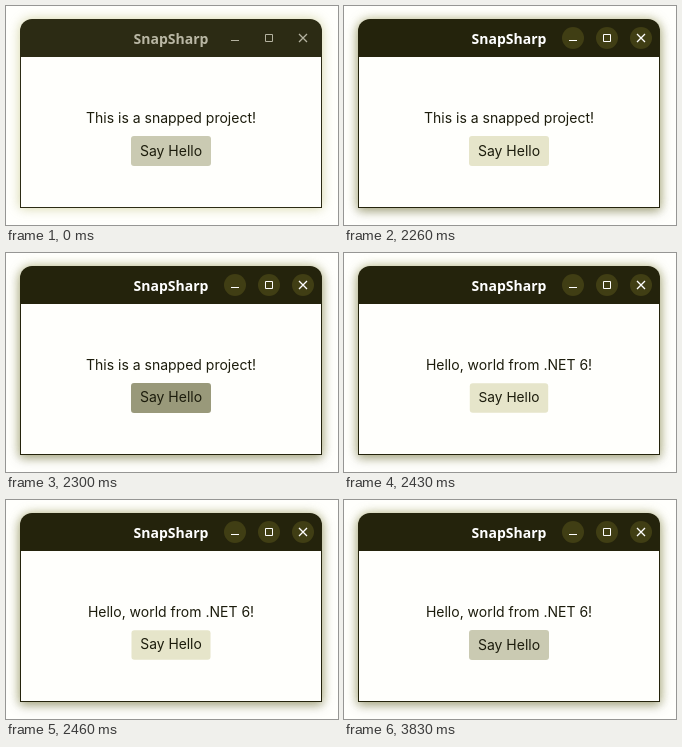
Recreate the animation shown at these times as an HTML page. Size 332 by 219 pixels, loop 6070 ms.

```html
<!DOCTYPE html>
<html lang="en">
<head>
<meta charset="utf-8">
<style>
  html, body { margin: 0; width: 100%; height: 100%; overflow: hidden; background: #fffffc; }
  svg { display: block; width: 332px; height: 219px; }
  text { text-anchor: middle; font: 14px Inter, sans-serif; fill: #1c1c0c; }
  #frame { fill: #2c2b14; filter: drop-shadow(0 0 6px #80800058); }
  #title { font: bold 14px "Noto Sans", "Open Sans", sans-serif; fill: #b9b7a4; }
  #icons { fill: none; stroke: #b4b2a0; }
  #discs { fill: #403e14; visibility: hidden; }
  .active #frame { fill: #24230c; filter: drop-shadow(0 0 6px #80800050) drop-shadow(0 3px 5px #30301060); }
  .active #title { fill: #fff; }
  .active #icons { stroke: #fff; }
  .active #discs { visibility: visible; }
</style>
</head>
<body>
<svg id="stage" viewBox="0 0 332 219">
  <path id="frame" d="M14 202V25a12 12 0 0 1 12-12H304a12 12 0 0 1 12 12V202z"/>
  <path d="M15 51H315V201H15z" fill="#fffffc"/>
  <text id="title" x="165" y="38">SnapSharp</text>
  <g id="discs">
    <circle cx="229" cy="32" r="11"/>
    <circle cx="263" cy="32" r="11"/>
    <circle cx="297" cy="32" r="11"/>
  </g>
  <g id="icons">
    <path d="M225 34.5h8M259.5 28.5h7v7h-7z"/>
    <path d="M293 28l8 8m0-8l-8 8" stroke-width="1.3"/>
  </g>
  <text id="message" x="165" y="117"></text>
  <rect id="face" x="125" y="130" width="80" height="30" rx="3"/>
  <text id="label" x="165">Say Hello</text>
</svg>
<script>
  const LOOP = 6070, LEAVE = 3830, ENTER = 1320, FOCUS = 2260, PRESS = 2300, RELEASE = 2430, EASE = 75;
  const NORMAL = '#cacab2', HOVER = '#e6e5ca', PRESSED = '#99997a';
  const el = id => document.getElementById(id);
  const stage = el('stage'), message = el('message'), face = el('face'), label = el('label');
  const progress = (t, start) => Math.max(0, Math.min(1, (t - start) / EASE));

  function draw(t) {
    const pressed = t >= PRESS && t < RELEASE;
    const hovered = t >= ENTER && t < LEAVE;
    const scale = 1 - 0.02 * (progress(t, PRESS) - progress(t, RELEASE));
    stage.classList.toggle('active', t >= FOCUS);
    message.textContent = t < RELEASE ? 'This is a snapped project!' : 'Hello, world from .NET 6!';
    face.setAttribute('fill', pressed ? PRESSED : hovered ? HOVER : NORMAL);
    face.setAttribute('transform', `translate(165 145) scale(${scale}) translate(-165 -145)`);
    // The label scales with its button, on a baseline snapped to whole pixels.
    label.style.fontSize = `${14 * scale}px`;
    label.setAttribute('y', Math.floor(145 + 5 * scale));
  }

  const start = performance.now();
  function tick() {
    draw((performance.now() - start) % LOOP);
    requestAnimationFrame(tick);
  }
  tick();
</script>
</body>
</html>
```
